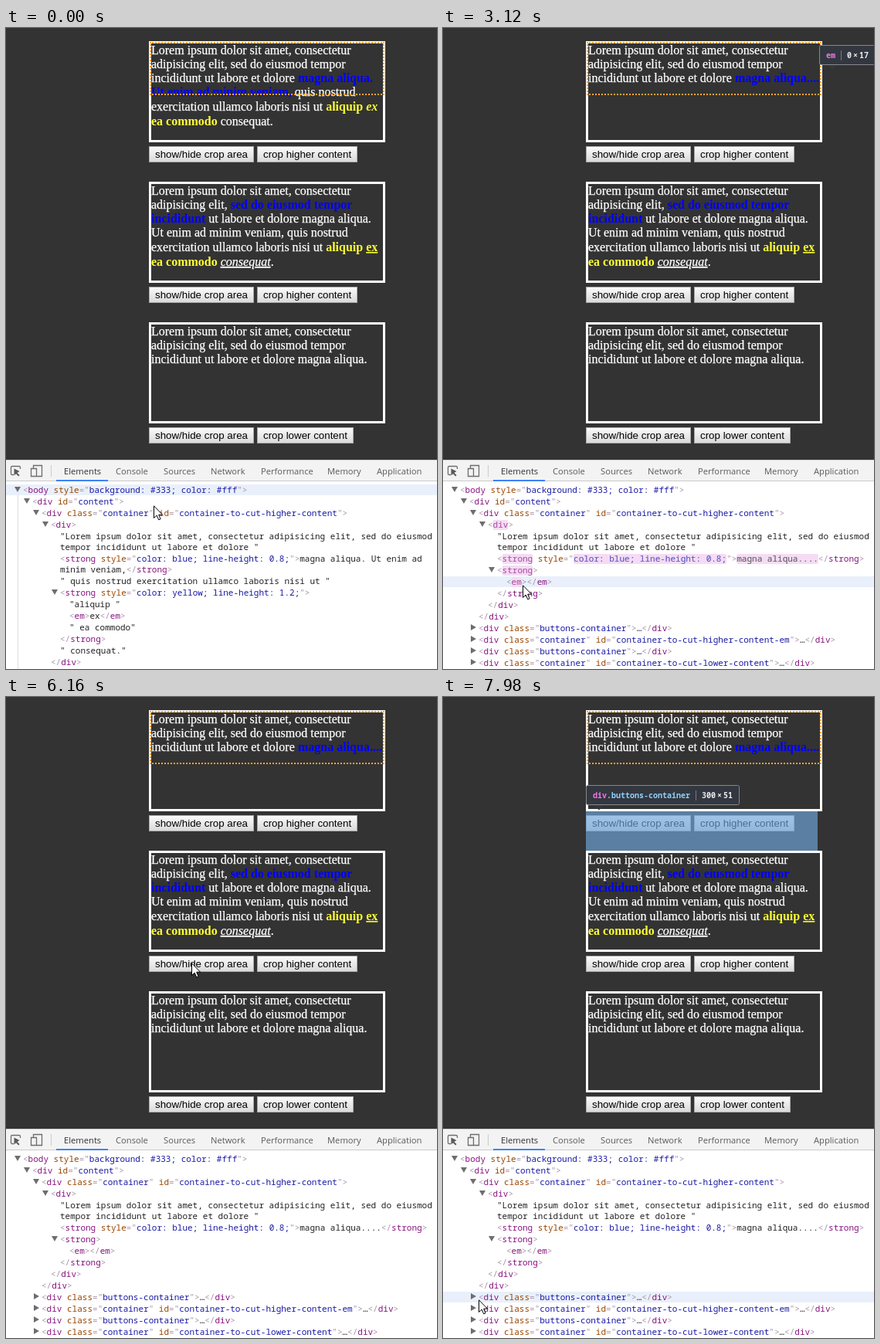
An HTML page that plays this animation: 558 by 830 pixels, repeating every 8000 ms.

```html
<!DOCTYPE html>
<html lang="en">
<head>
<meta charset="utf-8">
<title>Cropping content</title>
<style>
  html, body { margin: 0; width: 100%; height: 100%; overflow: hidden; background: #333; }
  svg { display: block; }
  text { white-space: pre; }
  .page text { font: 16px "Liberation Serif", serif; fill: #fff; stroke: #fff; stroke-width: .25; }
  .page .button { font: 13.333px "Liberation Sans", sans-serif; fill: #000; stroke: none; }
  .page .blue { font-weight: bold; fill: #00f; stroke: none; }
  .page .yellow { font-weight: bold; fill: #ff3; stroke: none; }
  .it { font-style: italic; }
  .un { text-decoration: underline; }
  .crop { box-sizing: border-box; width: 304px; height: 69px; border: 2px dotted #ffa530; }
  .tab { font: 11.2px "Open Sans", sans-serif; fill: #5a5a5a; }
  .tab.on { fill: #333; }
  .tree text { font: 11px "Noto Sans Mono", monospace; fill: #222; }
  .tree .punct { fill: #a894a6; }
  .tree .tag { fill: #881280; }
  .tree .attr { fill: #994500; }
  .tree .value { fill: #1a1aa6; }
  .tree .flash { fill: #fff; }
  .tip text { font: 600 10px "Noto Sans Mono", monospace; fill: #e8eaed; }
  .tip .tag { fill: #ee78e6; }
  .tip .id { fill: #ffab66; }
  .tip .class { fill: #8ed0f8; }
</style>
</head>
<body>
<svg id="stage" width="558" height="830" viewBox="0 0 558 830"></svg>
<script>
const LOOP = 8000, CLICK = 2040, FLASH = 1400;
const ROW_LAG = 50, TIP_LAG = 120;
const CHAR = 6.6, TIP_CHAR = 6;

// Pointer path: time, x, y
const path = [
  [-100, 196, 582], [0, 191, 618], [300, 168, 742], [560, 158, 790], [680, 150, 735],
  [820, 143, 724], [980, 140, 778], [1180, 160, 725], [1400, 270, 540], [1680, 401, 158],
  [1850, 389, 161], [2040, 389, 161], [2820, 150, 565], [2870, 145, 600], [2980, 108, 712],
  [3120, 103, 721], [3660, 110, 732], [4000, 100, 703], [4440, 104, 726], [4560, 104, 726],
  [4800, 112, 733], [5150, 138, 690], [5230, 144, 642], [5280, 148, 599], [5330, 152, 566],
  [5700, 215, 420], [6160, 240, 344], [6220, 241, 345], [6410, 241, 345], [6600, 290, 430],
  [6800, 335, 574], [6850, 330, 592], [7000, 250, 690], [7160, 130, 800], [7400, 75, 806],
  [7650, 50, 772], [7980, 46, 780]
];

const tabs = [
  ['Elements', 75, 65], ['Console', 142, 132], ['Sources', 204, 194], ['Network', 265, 255],
  ['Performance', 330, 320], ['Memory', 416, 407], ['Application', 480, 470]
];
const TABS_END = 549;

// Tree rows: depth, arrow, element, lines
const head = [
  [0, 'v', 'body', '<body style="background: #333; color: #fff">'],
  [1, 'v', 'content', '<div id="content">'],
  [2, 'v', 'box1', '<div class="container" id="container-to-cut-higher-content">'],
  [3, 'v', 'div', '<div>'],
  [4, '', '', '"Lorem ipsum dolor sit amet, consectetur adipisicing elit, sed do eiusmod',
    'tempor incididunt ut labore et dolore "']
];
const fullRows = [...head,
  [4, '', 'blue', '<strong style="color: blue; line-height: 0.8;">magna aliqua. Ut enim ad', 'minim veniam,</strong>'],
  [4, '', '', '" quis nostrud exercitation ullamco laboris nisi ut "'],
  [4, 'v', 'yellow', '<strong style="color: yellow; line-height: 1.2;">'],
  [5, '', '', '"aliquip "'],
  [5, '', 'em', '<em>ex</em>'],
  [5, '', '', '" ea commodo"'],
  [4, '', 'yellow', '</strong>'],
  [4, '', '', '" consequat."'],
  [3, '', 'div', '</div>']
];
const croppedRows = [...head,
  [4, '', 'blue', '<strong style="color: blue; line-height: 0.8;">magna aliqua....</strong>'],
  [4, 'v', 'yellow', '<strong>'],
  [5, '', 'em', '<em></em>'],
  [4, '', 'yellow', '</strong>'],
  [3, '', 'div', '</div>'],
  [2, '', 'box1', '</div>'],
  [2, '>', 'buttons1', '<div class="buttons-container">…</div>'],
  [2, '>', 'box2', '<div class="container" id="container-to-cut-higher-content-em">…</div>'],
  [2, '>', 'buttons2', '<div class="buttons-container">…</div>'],
  [2, '>', 'box3', '<div class="container" id="container-to-cut-lower-content">…</div>']
];
// Changed pieces after the click: row, column, text
const changed = [
  [3, 1, 'div'], [5, 1, 'strong'], [5, 15, 'color: blue; line-height: 0.8;'],
  [5, 47, 'magna aliqua....'], [6, 1, 'strong'], [7, 1, 'em']
];

// Inspected elements: label, x, y, width, height
const boxName = 'div#container-to-cut-';
const elements = {
  body: ['body', 8, 17, 654, 541],
  content: ['div#content', 185, 17, 300, 541],
  box1: [boxName + 'higher-content.container', 185, 17, 306, 131],
  box2: [boxName + 'higher-content-em.container', 185, 199, 306, 131],
  box3: [boxName + 'lower-content.container', 185, 381, 306, 131],
  buttons1: ['div.buttons-container', 185, 148, 300, 51],
  buttons2: ['div.buttons-container', 185, 330, 300, 51],
  div: ['div', 188, 20, 300, 110],
  blue: ['strong', 188, 57, 300, 35],
  yellow: ['strong', 188, 93, 293.28, 36],
  em: ['em', 466, 93, 16, 18]
};
const croppedElements = {
  ...elements,
  div: ['div', 188, 20, 300, 54],
  blue: ['strong', 378, 57, 110, 17],
  yellow: ['strong', 487, 56, 0, 17],
  em: ['em', 487, 56, 0, 17]
};

const rect = (x, y, w, h, fill, more = '') =>
  `<rect x="${x}" y="${y}" width="${w}" height="${h}" fill="${fill}" ${more}/>`;
const text = (x, y, s, cls = '') => `<text x="${x}" y="${y}" class="${cls}">${s}</text>`;
const span = (cls, s) => `<tspan class="${cls}">${s}</tspan>`;
const shape = (d, more = '') => `<path d="${d}" ${more}/>`;

function markup(line) {
  return line.replace(/<(\/?)(\w+)((?: \w+="[^"]*")*)>|[^<]+/g, (all, slash, tag, attrs) => {
    if (!tag) return all;
    const list = attrs.replace(/( \w+)="([^"]*)"/g, (m, name, value) =>
      span('attr', name) + span('punct', '="') + span('value', value) + span('punct', '"'));
    return span('punct', '&lt;' + slash) + span('tag', tag) + list + span('punct', '&gt;');
  });
}

// Gives every row its place and the end of its children
function layout(rows, top) {
  const placed = rows.map(([depth, arrow, key, ...lines]) => {
    const row = { depth, arrow, key, lines, x: 22 + 12 * depth, top, h: lines.length * 14 + 1 };
    top += row.h;
    return row;
  });
  placed.forEach((row, i) => {
    const next = placed.slice(i + 1).find(r => r.depth <= row.depth);
    row.end = next ? next.top : 830;
  });
  return placed;
}

function drawRows(rows) {
  return rows.map(({ x, top, arrow, lines }) => {
    const ax = x - 7, ay = top + 7;
    const mark = arrow === 'v' ? `M${ax - 4} ${ay - 3}h8l-4 7z`
      : arrow === '>' ? `M${ax - 3} ${ay - 4}v8l7-4z` : '';
    return (mark && shape(mark, 'fill="#6e6e6e"')) +
      lines.map((line, i) => text(x, top + 12 + i * 14, markup(line))).join('');
  }).join('');
}

function pageBox(y, lines) {
  const base = [17, 35, 53, 71, 90, 109];
  return rect(186.5, y + 1.5, 303, 128, 'none', 'stroke="#fff" stroke-width="3"') +
    lines.map((s, i) => text(188, y + base[i], s)).join('');
}

function buttons(y, label, w) {
  const one = (x, width, s) =>
    rect(x + .5, y + .5, width - 1, 20, 'url(#face)', 'stroke="#a8a8a8"') +
    text(x + 8, y + 15, s, 'button');
  return one(185, 136, 'show/hide crop area') + one(325, w, label);
}

const first = 'Lorem ipsum dolor sit amet, consectetur';
const second = 'adipisicing elit, sed do eiusmod tempor';
const third = 'incididunt ut labore et dolore ';
const fourth = 'exercitation ullamco laboris nisi ut ';

const page = `<g class="page">${rect(0, 0, 558, 560, '#333')}` +
  pageBox(17, [first, second, third]) +
  `<g id="full">` +
    text(378, 70, 'magna aliqua.', 'blue') +
    text(188, 88, span('blue', 'Ut enim ad minim veniam,') + ' quis nostrud') +
    text(188, 107, fourth + span('yellow', 'aliquip ' + span('it', 'ex'))) +
    text(188, 126, span('yellow', 'ea commodo') + ' consequat.') +
  `</g><g id="cropped">${text(378, 70, 'magna aliqua....', 'blue')}</g>` +
  '<foreignObject x="186" y="18" width="304" height="69"><div class="crop"></div></foreignObject>' +
  buttons(153, 'crop higher content', 130) +
  pageBox(199, [
    first,
    'adipisicing elit, ' + span('blue', 'sed do eiusmod tempor'),
    span('blue', 'incididunt') + ' ut labore et dolore magna aliqua.',
    'Ut enim ad minim veniam, quis nostrud',
    fourth + span('yellow', 'aliquip ' + span('un', 'ex')),
    span('yellow', 'ea commodo') + ' ' + span('it un', 'consequat') + '.'
  ]) +
  buttons(335, 'crop higher content', 130) +
  pageBox(381, [first, second, third + 'magna aliqua.']) +
  buttons(517, 'crop lower content', 125) + '</g>';

const full = layout(fullRows, 590), cropped = layout(croppedRows, 590);

const flashes = changed.map(([i, col, s]) => {
  const x = cropped[i].x + col * CHAR, y = cropped[i].top;
  return { x, y, w: s.length * CHAR, s };
});

const toolbar = rect(0, 559, 558, 28, '#f3f3f3') + rect(0, 559, 558, 1, '#ccc') +
  rect(0, 586, 558, 1, '#ccc') + rect(0, 560, 0, 26, '#e6e6e6', 'id="tabHover"') +
  shape('M10 578.500H8Q6.500 578.500 6.500 577V569Q6.500 567.500 8 567.500H17Q18.500 567.500 18.500 569V571', 'fill="none" stroke="#6e6e6e" stroke-width="1.300"') +
  shape('M10.500 570.500V579.500L13 577.300 16.200 580.500 17.600 579 14.500 576 17.500 574Z', 'fill="#5a5a5a"') +
  shape('M35.500 570V566.500H46.500V580.500H40M32.500 570.500H39.500V580.500H32.500Z', 'fill="none" stroke="#6e6e6e" stroke-width="1.300"') +
  rect(58, 566, 1, 15, '#ccc') + rect(65, 585, 67, 2, '#3e82f7') +
  tabs.map(([s, x], i) => text(x, 578, s, i ? 'tab' : 'tab on')).join('');

const tree = `<g class="tree">${rect(0, 587, 558, 243, '#fff')}` +
  rect(0, 0, 558, 0, '#e9f0fb', 'id="rowHover"') + rect(0, 0, 1, 0, '#dcdcdc', 'id="guide"') +
  `<g id="flashBack">${flashes.map(f => rect(f.x, f.y + 2, f.w, 13, 'inherit', 'rx="2"')).join('')}</g>` +
  `<g id="fullTree">${drawRows(full)}</g><g id="croppedTree">${drawRows(cropped)}</g>` +
  `<g id="flashText">${flashes.map(f => text(f.x, f.y + 12, f.s, 'flash')).join('')}</g></g>`;

const outline = 'fill="#fff" stroke="#000" stroke-linejoin="round"';
const pointer = `<g id="arrow">${shape('M.5.8V16.500L4.200 13.100 6.700 18.800 9.100 17.800 6.700 12.200H11.600Z', outline)}</g>` +
  `<g id="hand">${shape('M-.5 13V2Q-.5.5 1 .5T2.500 2V7.500Q2.700 6 4 6T5.500 8Q5.800 7 7 7T8.300 9Q8.700 8 9.600 8.300T10.500 10V15.500L8.500 19V22.500H.5V20L-4.500 13.500Q-5 11.500-3.300 11.500Z', outline)}` +
  `${shape('M2.500 7.500V12M5.500 8V12M8.300 9V12.500', 'stroke="#000" fill="none"')}</g>`;

const stage = document.getElementById('stage');
stage.innerHTML = `<defs><linearGradient id="face" x2="0" y2="1">
  <stop stop-color="#fbfbfb"/><stop offset="1" stop-color="#d9d9d9"/></linearGradient></defs>` +
  page + '<g id="overlay"></g>' + toolbar + tree + `<g id="pointer">${pointer}</g>`;

const ui = {};
stage.querySelectorAll('[id]').forEach(el => ui[el.id] = el);
const show = (el, on) => el.style.display = on ? '' : 'none';
const set = (el, attrs) => { for (const k in attrs) el.setAttribute(k, attrs[k]); };

function pointerAt(t) {
  const i = path.findIndex(p => p[0] > t);
  if (i === 0) return path[0].slice(1);
  if (i < 0) return path[path.length - 1].slice(1);
  const [t0, x0, y0] = path[i - 1], [t1, x1, y1] = path[i];
  const k = (t - t0) / (t1 - t0);
  return [x0 + (x1 - x0) * k, y0 + (y1 - y0) * k];
}

function rowAt(rows, t) {
  const y = pointerAt(t)[1];
  return rows.find(r => y >= r.top && y < r.top + r.h);
}

function tooltip(label, x, y, w, h) {
  const size = `${w}×${h}`, wl = label.length * TIP_CHAR;
  const width = wl + size.length * TIP_CHAR + 36;
  const above = y > 40;
  const top = above ? y - 33.5 : Math.min(y + h + 8, 524) + .5;
  const edge = above ? top + 25 : top, dir = above ? 7 : -7;
  const name = label.replace(/^\w+|[#.][\w-]+/g, s =>
    span(s[0] === '#' ? 'id' : s[0] === '.' ? 'class' : 'tag', s));
  const dx = x + wl + 24, times = dx + `${w}`.length * TIP_CHAR + 2;
  return '<g class="tip">' + shape(`M${x + 10} ${edge}h14l-7 ${dir}z`, 'fill="#33373f"') +
    rect(x + .5, top, width, 25, '#33373f', 'rx="2" stroke="#85888e"') +
    text(x + 9, top + 16.5, name) + rect(x + wl + 16, top + 6.5, 1, 13, '#777c84') +
    text(dx, top + 16.5, w) + text(times, top + 16.5, '×') +
    text(times + 8, top + 16.5, h) + '</g>';
}

function highlight(key, [label, x, y, w, h]) {
  const blue = 'rgba(111,168,220,.66)', orange = 'rgba(246,178,107,.66)';
  let s = rect(x, y, w, h, blue);
  if (key === 'content') s += rect(0, y, x, h, orange) + rect(x + w, y, 558 - x - w, h, orange);
  if (key.startsWith('box')) {
    s = rect(x + 3, y + 3, w - 6, h - 6, blue) +
      rect(x + 1.5, y + 1.5, w - 3, h - 3, 'none', 'stroke="rgba(255,229,153,.66)" stroke-width="3"');
  }
  return s + tooltip(label, x, y, w, h);
}

function drawFlash(t) {
  const p = (t - CLICK) / FLASH, on = p >= 0 && p < 1;
  show(ui.flashBack, on);
  show(ui.flashText, on);
  if (!on) return;
  const k = 1 - (1 - Math.min(1, p / .8)) ** 3;
  const fade = p > .8 ? (1 - p) / .2 : 1;
  const [r, g, b] = [[158, 245], [54, 219], [153, 244]].map(([from, to]) => from + (to - from) * k);
  set(ui.flashBack, { fill: `rgb(${r},${g},${b})`, opacity: fade });
  set(ui.flashText, { opacity: (1 - .7 * k) * fade });
}

let shown = '';
function render(t) {
  const isCropped = t >= CLICK;
  const rows = isCropped ? cropped : full;
  show(ui.full, !isCropped);
  show(ui.fullTree, !isCropped);
  show(ui.cropped, isCropped);
  show(ui.croppedTree, isCropped);
  drawFlash(t);

  const row = rowAt(rows, t - ROW_LAG);
  set(ui.rowHover, row ? { y: row.top + 1, height: row.h - 1 } : { height: 0 });
  const open = row && row.arrow === 'v';
  set(ui.guide, open ? { x: row.x - 7, y: row.top + row.h, height: row.end - row.top - row.h } : { height: 0 });

  const settled = row && row.key && row === rowAt(rows, t - TIP_LAG);
  const id = settled ? row.key + isCropped : '';
  if (id !== shown) {
    const list = isCropped ? croppedElements : elements;
    ui.overlay.innerHTML = settled ? highlight(row.key, list[row.key]) : '';
    shown = id;
  }

  const [hx, hy] = pointerAt(t - ROW_LAG);
  const onTab = hy >= 560 && hy < 586 && hx >= 65 && hx < TABS_END;
  const i = onTab ? tabs.findLastIndex(tab => hx >= tab[2]) : -1;
  const right = i + 1 < tabs.length ? tabs[i + 1][2] : TABS_END;
  set(ui.tabHover, onTab ? { x: tabs[i][2], width: right - tabs[i][2] } : { width: 0 });
  show(ui.hand, onTab);
  show(ui.arrow, !onTab);

  const [x, y] = pointerAt(t).map(Math.round);
  set(ui.pointer, { transform: `translate(${x} ${y})` });
}

const start = performance.now();
function tick() {
  render((performance.now() - start) % LOOP);
  requestAnimationFrame(tick);
}
tick();
</script>
</body>
</html>
```
